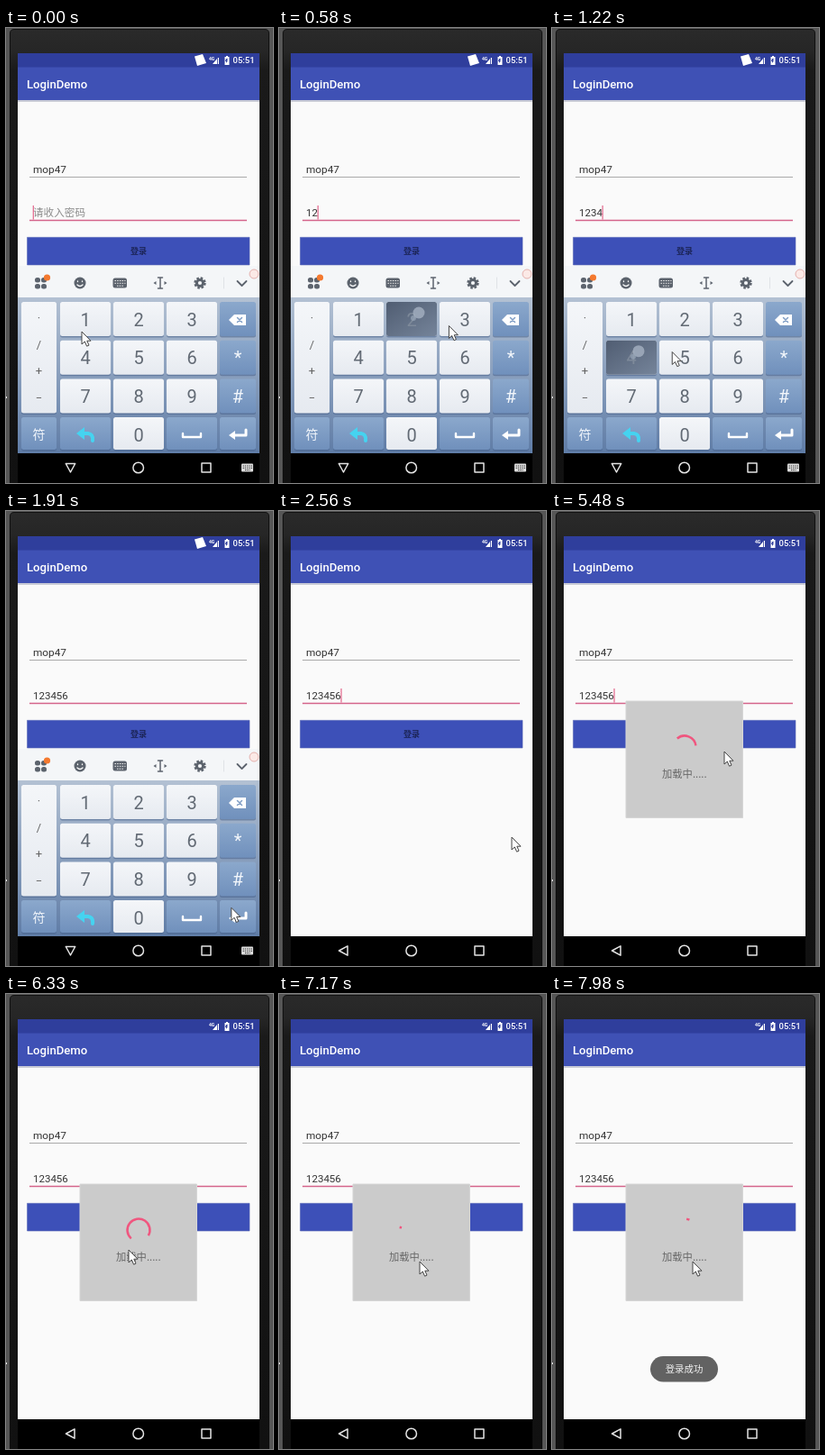
These frames come from a looping animation (296x505 px, 8 s). An HTML page:

```html
<!DOCTYPE html>
<html lang="zh">
<head>
<meta charset="utf-8">
<title>Login</title>
<style>
  html, body { margin: 0; width: 100%; height: 100%; overflow: hidden; background: #555; }
  svg { display: block; width: 296px; height: 505px; font-family: Roboto, "Noto Sans CJK SC", "Noto Sans CJK", sans-serif; }
  .cjk { font-family: "Noto Sans CJK SC", "Noto Sans CJK", sans-serif; }
  .mid { text-anchor: middle; }
  .line { fill: none; stroke-linecap: round; stroke-linejoin: round; }
</style>
</head>
<body>
<svg viewBox="0 0 296 505">
  <defs>
    <linearGradient id="board" x2="0" y2="1"><stop stop-color="#b3c1d3"/><stop offset="1" stop-color="#5f7ca6"/></linearGradient>
    <linearGradient id="light" x2="0" y2="1"><stop stop-color="#f4f6f9"/><stop offset="1" stop-color="#e6eaf0"/></linearGradient>
    <linearGradient id="blue" x2="0" y2="1"><stop stop-color="#8ba8cc"/><stop offset="1" stop-color="#7090bc"/></linearGradient>
    <linearGradient id="dark" x2="1" y2="1"><stop stop-color="#505d72"/><stop offset="1" stop-color="#75849a"/></linearGradient>
    <linearGradient id="frame" x2="0" y2="1"><stop stop-color="#2a2a2a"/><stop offset=".05" stop-color="#262626"/><stop offset=".09" stop-color="#1a1a1a"/><stop offset="1" stop-color="#111"/></linearGradient>
    <clipPath id="screen"><path d="M13 28H281V472H13z"/></clipPath>
  </defs>

  <path fill="#565656" d="M0 0H296V505H0z"/>
  <path fill="url(#frame)" stroke="#101010" d="M4.500 505V6Q4.500 1.500 9 1.500H287Q291.500 1.500 291.500 6V505z"/>
  <path fill="#eee" d="M0 409h1v2h-1z"/>

  <g clip-path="url(#screen)">
    <path fill="#fafafa" d="M13 28H281V472H13z"/>
    <path fill="#c9cbd6" d="M13 80H281V82H13z"/>
    <path fill="#3f51b5" d="M13 43H281V80H13z"/>
    <path fill="#2f3e9c" d="M13 28H281V43.500H13z"/>
    <text x="23" y="66.500" font-size="13.150" font-weight="500" fill="#fff">LoginDemo</text>
    <g fill="#fff">
      <text x="251.500" y="39.300" font-size="9.500" font-weight="500">05:51</text>
      <path d="M242.500 32h1.500v-1h2v1h1.500v9h-5z"/>
      <path d="M229 40l5-6v6zM234.800 33h1.200v7h-1.200z"/>
      <text x="225" y="36" font-size="5" font-weight="700">4G</text>
    </g>
    <path fill="#2f3e9c" d="M244 34h2l-1 2h1l-2 3v-2h-1z"/>
    <path id="badge" fill="#fff" d="M209 31.500l9-2.500 4 10-10 3z"/>

    <text x="30" y="161" font-size="11.800" fill="#333">mop47</text>
    <path stroke="#aaa" d="M26 165.500H267"/>
    <text id="hint" class="cjk" x="30" y="209.300" font-size="11.600" fill="#8c8c8c">请收入密码</text>
    <text id="pass" x="30" y="209" font-size="11.500" fill="#333"></text>
    <path stroke="#d4648a" stroke-width="1.400" d="M26 213.500H267"/>
    <path id="caret" stroke="#e0557f" stroke-width="1.200" d="M0 197V212.500"/>
    <path fill="#3d50b8" stroke="#5e6cb8" stroke-width=".6" d="M23.500 232.300H270V263H23.500z"/>
    <text class="cjk mid" x="147" y="251" font-size="9" font-weight="700" fill="#1c2558">登录</text>

    <g id="keyboard"></g>
  </g>

  <g id="dialog">
    <path fill="#cbcbcb" stroke="#d6d6d6" d="M82 211H211.500V340.500H82z"/>
    <text class="cjk" x="122" y="296" font-size="11.300" fill="#666">加载中.....</text>
    <path id="arc" fill="none" stroke="#f0567f" stroke-width="2.500"/>
  </g>
  <g id="toast">
    <rect x="109" y="402" width="75" height="28.500" rx="14.250" fill="#626262"/>
    <text class="cjk mid" x="146.500" y="420" font-size="10.400" fill="#f4f4f4">登录成功</text>
  </g>

  <path fill="#000" d="M13 472H281V505H13z"/>
  <g class="line" stroke="#e4e4e4" stroke-width="1.500">
    <path id="back" d="M66.500 488L76 482.800V493.200z"/>
    <circle cx="146.700" cy="488" r="5.800"/>
    <path d="M217 483H227V493H217z"/>
  </g>
  <g id="ime">
    <rect x="261" y="483.500" width="13" height="9" rx="1" fill="#ddd"/>
    <path stroke="#222" stroke-dasharray="1.300 1" d="M262.500 486H273M262.500 488.300H273M265 490.600H270.500"/>
  </g>

  <path id="mouse" fill="#fff" stroke="#444" stroke-linejoin="round" d="M0 0V14L3.300 11L5.600 16.200L8 15.100L5.800 10.200H10z"/>
</svg>
<script>
const LOOP = 8000;
const $ = id => document.getElementById(id);
const COLS = [[17, 39], [60, 56], [119, 56], [178, 56], [237, 40]];
const ROWS = [304, 346.700, 389.400, 432];
const KEY_H = 38;

const rect = (x, y, w, h, fill, extra = '') =>
  `<rect x="${x}" y="${y}" width="${w}" height="${h}" rx="2.500" fill="${fill}" ${extra}/>`;
const label = (x, y, text, size, fill) =>
  `<text class="mid" x="${x}" y="${y}" font-size="${size}" fill="${fill}">${text}</text>`;
const line = (d, color, width) =>
  `<path class="line" d="${d}" stroke="${color}" stroke-width="${width}"/>`;

function key(col, row, text, fill = 'blue', rows = 1, size = 20) {
  const [x, w] = COLS[col], y = ROWS[row];
  const h = (row === 3 ? 36 : KEY_H) + (rows - 1) * 42.700;
  const ink = fill === 'light' ? '#626a74' : '#f2f6fb';
  return rect(x, y + 1.500, w, h, '#435d85', 'opacity=".5"') + rect(x, y, w, h, `url(#${fill})`) +
    label(x + w / 2, y + 19.500 + size * .35, text, size, ink);
}

function pressedKey(n) {
  const [x, w] = COLS[1 + (n - 1) % 3], y = ROWS[Math.floor((n - 1) / 3)];
  return `<g id="press${n}" opacity="0">${rect(x, y, w, KEY_H, 'url(#dark)')}
    ${label(x + w / 2, y + 26.500, n, 20, '#7e8a9a')}
    <circle cx="${x + 36}" cy="${y + 12}" r="6.500" fill="#a9b6c6" opacity=".75"/>
    <circle cx="${x + 30}" cy="${y + 18}" r="3" fill="#98a6b8" opacity=".7"/></g>`;
}

function toolbar() {
  const ink = '#5c636d';
  let s = '<path fill="#f4f6f8" d="M13 264H281V300H13z"/>';
  for (const [x, y] of [[32, 277], [32, 284], [39, 284], [39, 277]]) s += rect(x, y, 6, 5.500, ink);
  s += '<circle cx="45.500" cy="277" r="3.600" fill="#f4792f"/>';
  s += `<circle cx="82" cy="283" r="6.500" fill="${ink}"/>` + line('M79.500 281v.5M84.500 281v.5M79 285q3 3 6 0', '#fff', 1.300);
  s += rect(118.500, 277.500, 15.500, 11, ink) +
    '<path stroke="#eee" stroke-dasharray="1.500 1.200" d="M120.500 280.500H132.500M120.500 283.300H132.500M123 286.200H130"/>';
  s += line('M168.500 277H173.500M171 277V289M168.500 289H173.500', ink, 1.500);
  s += `<path fill="${ink}" d="M163.500 283l3-2v4zM178.500 283l-3-2v4z"/>`;
  s += `<circle cx="215" cy="283" r="5.500" fill="none" stroke="${ink}" stroke-width="2.400" stroke-dasharray="2.500 1.820"/>
    <circle cx="215" cy="283" r="3.600" fill="none" stroke="${ink}" stroke-width="3"/>`;
  s += line('M241.500 277V289', '#dfe2e6', 1) + line('M256.500 281L261.500 286L266.500 281', ink, 1.800);
  return s + '<circle cx="275" cy="273" r="5" fill="#fbe9e6" stroke="#e5b0ac"/>';
}

function keyboard() {
  let s = toolbar() + '<path fill="url(#board)" d="M13 299H281V472H13z"/>';
  s += key(0, 0, '', 'light', 3);
  ['·', '/', '+', '−'].forEach((c, i) => s += label(36.500, 326 + i * 29.500, c, 13, '#666'));
  for (let n = 1; n < 10; n++) s += key(1 + (n - 1) % 3, Math.floor((n - 1) / 3), n, 'light');
  s += key(4, 0, '') + key(4, 1, '*') + key(4, 2, '#');
  s += key(0, 3, '符', 'blue', 1, 14) + key(1, 3, '') + key(2, 3, '0', 'light') + key(3, 3, '') + key(4, 3, '');
  s += '<path fill="#fff" d="M247 324l6-6h13v12h-13z"/>' + line('M256.500 321.500l5 5M261.500 321.500l-5 5', '#7f9dc5', 1.500);
  s += line('M84 450H91Q97 451 96 458', '#45d3f0', 4) + '<path fill="#45d3f0" d="M78 450l9-7v14z"/>';
  s += line('M196 450V454H216V450', '#fff', 2.400);
  s += line('M266 446V452H252', '#fff', 3) + '<path fill="#fff" d="M247 452l7-5v10z"/>';
  for (let n = 1; n < 7; n++) s += pressedKey(n);
  return s;
}
$('keyboard').innerHTML = keyboard();

const TAPS = [90, 420, 680, 1060, 1320, 1570];
const HIDE = 2180, DIALOG = 4514, SPIN = 4558, TOAST = 7560;
const PATH = [
  [0, 84, 337], [130, 84, 337], [380, 145, 332], [460, 145, 332], [640, 203, 330], [740, 203, 330],
  [1030, 93, 361], [1120, 95, 361], [1270, 146, 359], [1360, 146, 360], [1520, 204, 363], [1630, 204, 363],
  [1980, 255, 449], [2200, 255, 449], [2560, 258, 362], [2700, 258, 361], [3500, 198, 266], [3860, 192, 256],
  [4060, 192, 256], [4200, 191, 255], [4800, 191, 255], [5300, 191, 267], [5600, 191, 267],
  [6250, 136, 284], [6500, 136, 284], [7170, 156, 297], [LOOP, 156, 297]
];

const clamp = v => Math.max(0, Math.min(1, v));
const smooth = v => v * v * (3 - 2 * v);

function mouseAt(t) {
  const i = PATH.findIndex(p => p[0] > t);
  const [t0, x0, y0] = PATH[i - 1], [t1, x1, y1] = PATH[i];
  const k = smooth((t - t0) / (t1 - t0));
  return [x0 + (x1 - x0) * k, y0 + (y1 - y0) * k];
}

// cubic-bezier(.4, 0, .2, 1)
function fastOutSlowIn(x) {
  let lo = 0, hi = 1;
  for (let i = 0; i < 20; i++) {
    const s = (lo + hi) / 2, r = 1 - s;
    if (1.2 * r * r * s + .6 * r * s * s + s ** 3 < x) lo = s; else hi = s;
  }
  return lo * lo * (3 - 2 * lo);
}

// The spinner stalls for a moment, then starts over.
function spinnerTime(t) {
  if (t >= 7925) return t - 7925;
  return Math.max(0, Math.min(t, 7170) - SPIN + Math.max(0, t - 7490));
}

function arcPath(ms) {
  const turns = ms / 1333, p = turns % 1;
  const tail = .75 * fastOutSlowIn(clamp(p * 2 - 1));
  const head = .75 * fastOutSlowIn(clamp(p * 2)) + .03;
  const base = p * .25 - .25 + turns * .4;
  const point = v => {
    const a = (base + v) * 2 * Math.PI;
    return `${147 + 12.5 * Math.cos(a)} ${262 + 12.5 * Math.sin(a)}`;
  };
  return `M${point(tail)}A12.5 12.5 0 ${head - tail > .5 ? 1 : 0} 1 ${point(head)}`;
}

function draw(t) {
  const typed = TAPS.filter(at => t >= at + 50).length;
  $('pass').textContent = '123456'.slice(0, typed);
  $('hint').style.opacity = typed ? 0 : 1;
  const stalled = t >= 7170 && t < 7490;
  const caretOn = t < 1850 || (!stalled && (t - 350) % 1000 < 500);
  $('caret').style.opacity = caretOn ? .9 : 0;
  $('caret').setAttribute('transform', `translate(${30.3 + typed * 6.45})`);

  TAPS.forEach((at, i) => {
    $('press' + (i + 1)).setAttribute('opacity', t < at ? 0 : 1 - clamp((t - at - 180) / 120));
  });

  const gone = clamp((t - HIDE) / 140), open = t < HIDE;
  $('keyboard').setAttribute('transform', `translate(0 ${gone * 60})`);
  $('keyboard').setAttribute('opacity', 1 - gone);
  $('badge').style.opacity = $('ime').style.opacity = open ? 1 : 0;
  $('back').setAttribute('transform', open ? 'rotate(-90 71.500 488)' : '');

  $('dialog').style.opacity = clamp((t - DIALOG) / 150);
  $('arc').setAttribute('d', arcPath(spinnerTime(t)));
  $('toast').style.opacity = clamp((t - TOAST) / 300);
  $('mouse').setAttribute('transform', `translate(${mouseAt(t)})`);
}

const start = performance.now();
function tick() {
  draw((performance.now() - start) % LOOP);
  requestAnimationFrame(tick);
}
tick();
</script>
</body>
</html>
```
